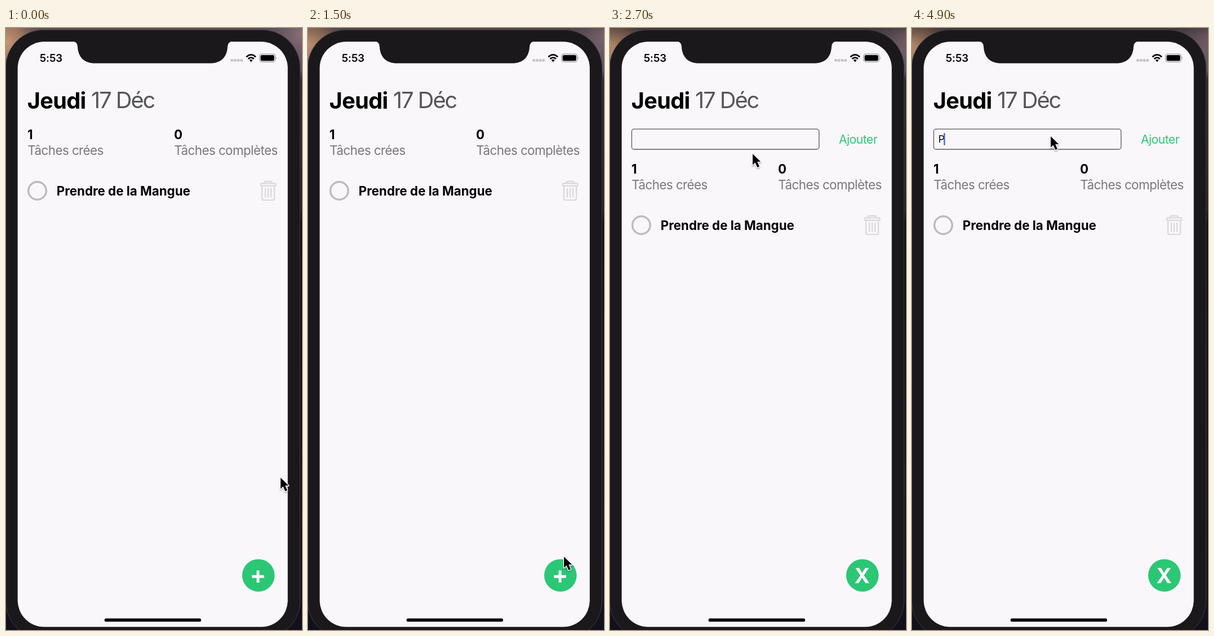
An HTML page that plays this animation: 525x1067 px, repeating every 5000 ms.

```html
<!DOCTYPE html>
<html lang="fr">
<head>
<meta charset="utf-8">
<title>Tâches</title>
<style>
  html, body { margin: 0; width: 100%; height: 100%; overflow: hidden; background: #14131a; }
  svg { display: block; width: 100vw; height: 100vh; }
  text { font-family: Inter, Roboto, "Liberation Sans", sans-serif; font-optical-sizing: none; }
  .bold { font-weight: 700; font-size: 22.3px; }
  .label { font-size: 22.3px; letter-spacing: -.52px; fill: #77767a; }
</style>
</head>
<body>
<svg viewBox="0 0 525 1067" preserveAspectRatio="none">
  <defs>
    <linearGradient id="wall" x2="0" y2="1">
      <stop offset="0" stop-color="#5b4f57"/>
      <stop offset=".07" stop-color="#5d5364"/>
      <stop offset=".085" stop-color="#2b2a32"/>
      <stop offset=".3" stop-color="#222126"/>
      <stop offset=".33" stop-color="#0c0c11"/>
      <stop offset=".75" stop-color="#17151b"/>
      <stop offset="1" stop-color="#10111d"/>
    </linearGradient>
    <radialGradient id="sunset" gradientUnits="userSpaceOnUse" cx="0" cy="26" r="75">
      <stop offset="0" stop-color="#c99873"/>
      <stop offset=".45" stop-color="#96705f"/>
      <stop offset="1" stop-color="#5b4f57" stop-opacity="0"/>
    </radialGradient>
    <radialGradient id="dusk" gradientUnits="userSpaceOnUse" cx="525" cy="12" r="70">
      <stop offset="0" stop-color="#8d6f77"/>
      <stop offset="1" stop-color="#5d5364" stop-opacity="0"/>
    </radialGradient>
    <linearGradient id="dim" x2="0" y2="1">
      <stop offset="0" stop-color="#252224" stop-opacity=".5"/>
      <stop offset="1" stop-color="#252224" stop-opacity="0"/>
    </linearGradient>
    <filter id="soft" x="-50%" y="-50%" width="200%" height="200%">
      <feDropShadow dx="0" dy="1.5" stdDeviation="1.3" flood-color="#000" flood-opacity=".4"/>
    </filter>
  </defs>

  <!-- desktop and phone -->
  <rect width="525" height="1067" fill="url(#wall)"/>
  <rect width="80" height="105" fill="url(#sunset)"/>
  <rect x="450" width="75" height="84" fill="url(#dusk)"/>
  <rect id="shade" width="525" height="42" fill="url(#dim)"/>
  <rect x="-.5" y="3.5" width="522" height="1079" rx="67" fill="#1a181b" stroke="#3f3d41"/>
  <rect x="20.7" y="24.3" width="479" height="1037.2" rx="47" fill="#faf7fb"/>
  <path d="M118 23.5Q126.5 24 127 33C128 52 139 62.5 158 62.5H362C381 62.5 392 52 393 33Q393.5 24 402 23.5Z" fill="#1a181b"/>

  <!-- status bar -->
  <text x="59.7" y="60" font-size="18.7" font-weight="600" letter-spacing="-.1">5:53</text>
  <g fill="#c3c2c5">
    <rect x="398.3" y="55" width="4.6" height="4.6" rx="1.2"/>
    <rect x="404" y="55" width="4.6" height="4.6" rx="1.2"/>
    <rect x="409.7" y="55" width="4.6" height="4.6" rx="1.2"/>
    <rect x="415.4" y="55" width="4.6" height="4.6" rx="1.2"/>
  </g>
  <g fill="none" stroke="#000" stroke-width="2.7">
    <path d="M426.4 51.3Q434.7 43.6 443 51.3"/>
    <path d="M429.5 54.7Q434.7 50 439.9 54.7"/>
  </g>
  <path d="M431.7 57Q434.7 54.5 437.7 57L434.7 60.2Z"/>
  <rect x="449.6" y="46.1" width="28" height="14" rx="4" fill="none" stroke="#98979a" stroke-width="1.2"/>
  <rect x="451.5" y="48" width="24.2" height="10.2" rx="2.3"/>
  <path d="M479 50.8Q481.2 53.1 479 55.4Z" fill="#98979a"/>

  <!-- heading -->
  <text x="37.8" y="142.5" font-size="39.7" font-weight="700" letter-spacing="-.7">Jeudi</text>
  <text x="151" y="142" font-size="39.7" letter-spacing="-2" fill="#555458">17 Déc</text>

  <!-- new task form -->
  <g id="form">
    <rect x="38.5" y="179.2" width="332.3" height="35.8" rx="4" fill="none" stroke="#59585b" stroke-width="1.3"/>
    <text x="406" y="204.8" font-size="21.05" letter-spacing="-.5" fill="#2bc775">Ajouter</text>
    <text id="typed" x="46.7" y="203" font-size="17.3">P</text>
    <rect id="caret" y="186" width="2.3" height="22" rx="1" fill="#3b62dc"/>
  </g>

  <!-- counters and list -->
  <g id="list">
    <text class="bold" x="38" y="197.3">1</text>
    <text class="label" x="38.3" y="225">Tâches crées</text>
    <text class="bold" x="298" y="197.3">0</text>
    <text class="label" x="298.3" y="225">Tâches complètes</text>
    <circle cx="55.5" cy="288.5" r="15.8" fill="none" stroke="#bbbabd" stroke-width="3.4"/>
    <text class="bold" x="89.8" y="296.5">Prendre de la Mangue</text>
    <g fill="none" stroke="#d9d8db" stroke-width="2.2" stroke-linecap="round" stroke-linejoin="round">
      <rect x="451.7" y="275.3" width="26.8" height="4.6" rx="1.6"/>
      <path d="M458.5 275V273.3Q458.5 271.8 460 271.8H470Q471.5 271.8 471.5 273.3V275"/>
      <path d="M454 280V301.5Q454 305 457.5 305H472.5Q476 305 476 301.5V280"/>
      <path d="M460 284.5V299.5M465 284.5V299.5M470 284.5V299.5"/>
    </g>
  </g>

  <!-- round button -->
  <g id="button">
    <circle cx="447.7" cy="970.2" r="28.8" fill="#2bc775"/>
    <path id="plus" d="M436.3 972.3H457.7M447 961.6V983" stroke="#fff" stroke-width="5"/>
    <text id="cross" x="447.2" y="984" font-size="37" font-weight="700" fill="#fff" text-anchor="middle">X</text>
  </g>

  <rect x="174.7" y="1046.5" width="171.3" height="5.8" rx="2.9"/>

  <g id="cursor" filter="url(#soft)">
    <path d="M1 2V21.7L5.5 17.5L9.3 26.1L13 24.5L9.2 16.1H15.2Z" stroke="#fff" stroke-width="2.6" stroke-linejoin="round" paint-order="stroke"/>
  </g>
</svg>
<script>
  const LOOP = 5000, STEP = 100;
  const OPEN = 2100, TYPE = 4600;
  const $ = id => document.getElementById(id);

  // rows: time, values...
  const pointer = [
    [0, 486, 795], [100, 480, 803], [300, 459, 821], [500, 451, 814],
    [1100, 451, 814], [1300, 452, 862], [1500, 453, 935], [1700, 454, 964],
    [2000, 454, 964], [2100, 444, 915], [2200, 392, 720], [2300, 324, 493],
    [2400, 288, 360], [2600, 257, 240], [2800, 247, 202], [3000, 245, 190]
  ];
  const press = [[1700, 1], [1800, .6], [1900, .23], [2000, .22], [2100, .5], [2200, .87], [2300, .99], [2400, 1]];
  const blink = [[3400, 0], [3500, 1], [3900, 1], [4000, .52], [4100, 0], [4300, 0], [4400, .5], [4500, 1]];
  const shade = [[1200, 0], [1800, 1]];

  function at(rows, t) {
    const i = rows.findIndex(r => r[0] > t);
    if (i === 0) return rows[0].slice(1);
    if (i < 0) return rows[rows.length - 1].slice(1);
    const a = rows[i - 1], b = rows[i], k = (t - a[0]) / (b[0] - a[0]);
    return a.slice(1).map((v, n) => v + (b[n + 1] - v) * k);
  }

  const show = (id, on) => $(id).setAttribute("visibility", on ? "visible" : "hidden");

  function draw(now) {
    const t = Math.floor((now % LOOP) / STEP) * STEP;
    const open = t >= OPEN, typed = t >= TYPE;
    $("cursor").setAttribute("transform", `translate(${at(pointer, t)})`);
    $("list").setAttribute("transform", `translate(0 ${open ? 61 : 0})`);
    $("button").setAttribute("opacity", at(press, t)[0]);
    $("shade").setAttribute("opacity", at(shade, t)[0]);
    $("caret").setAttribute("opacity", at(blink, t)[0]);
    $("caret").setAttribute("x", typed ? 56.3 : 47);
    show("form", open);
    show("typed", open && typed);
    show("plus", !open);
    show("cross", open);
  }

  let start;
  function tick(now) {
    start ??= now;
    draw(now - start);
    requestAnimationFrame(tick);
  }
  draw(0);
  requestAnimationFrame(tick);
</script>
</body>
</html>
```
